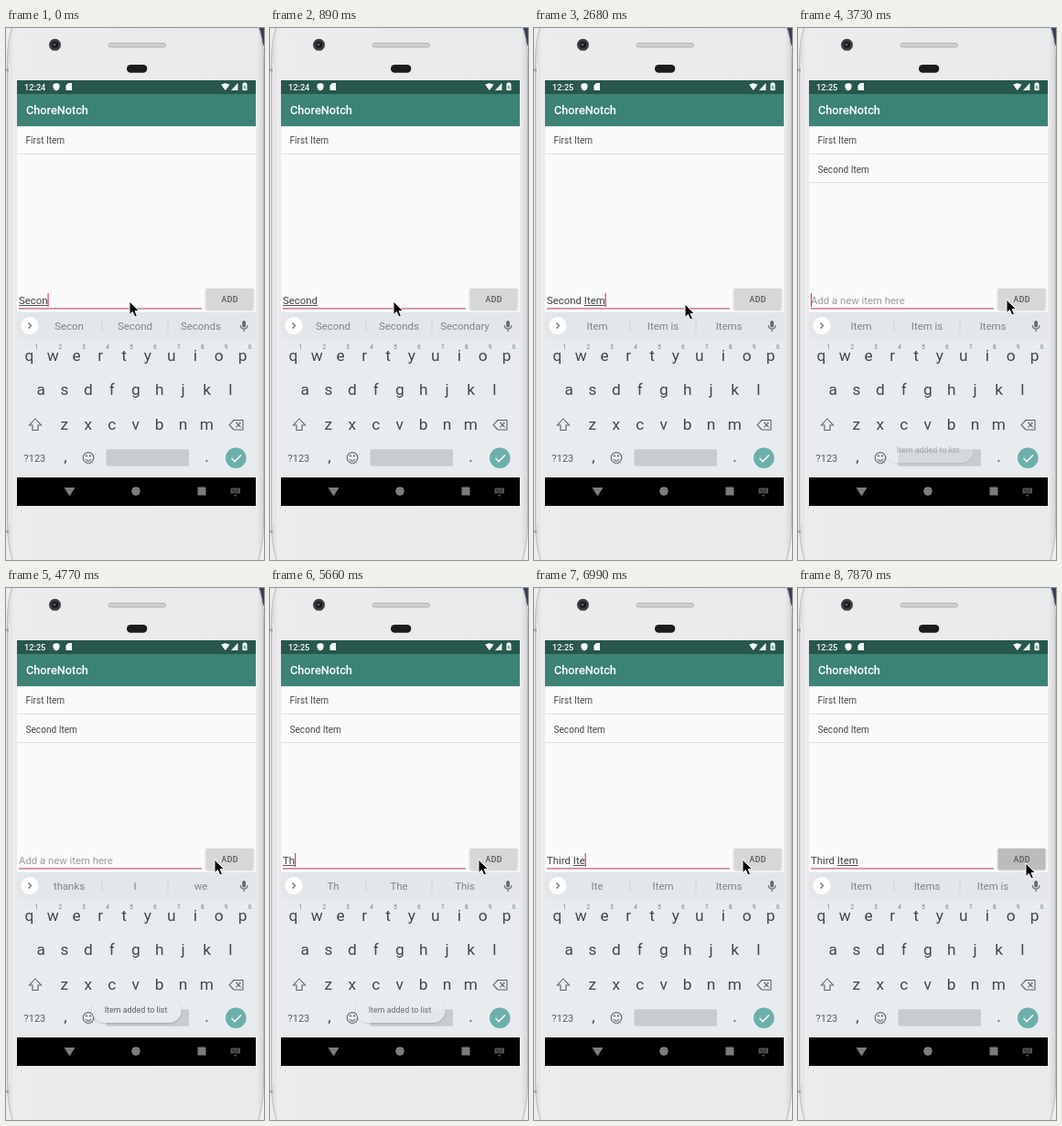
Animation, 282 px wide and 580 px high, one loop 8 s. Source, as an HTML page:

```html
<!DOCTYPE html>
<html lang="en">
<head>
<meta charset="utf-8">
<title>To-do list</title>
<style>
html, body { margin: 0; width: 100%; height: 100%; overflow: hidden; background: #eeecec; }
svg { display: block; width: 100%; height: 100%; font-family: Roboto, sans-serif; }
.mid { text-anchor: middle; }
.key { font-size: 17.3px; fill: #3d4a51; }
.num { font-size: 6.5px; fill: #737d82; }
.sug { font-size: 11.4px; fill: #7a8489; }
.row { font-size: 10.1px; fill: #484848; }
</style>
</head>
<body>
<svg id="stage" viewBox="0 0 282 580" xml:space="preserve">
  <defs>
    <linearGradient id="shell" x2="1" y2="0">
      <stop offset="0" stop-color="#d9d6d9"/>
      <stop offset=".025" stop-color="#ececee"/>
      <stop offset=".975" stop-color="#e9eaec"/>
      <stop offset="1" stop-color="#d6d5d8"/>
    </linearGradient>
    <filter id="soft" x="-20%" y="-40%" width="140%" height="200%">
      <feDropShadow dx="0" dy=".8" stdDeviation=".8" flood-opacity=".22"/>
    </filter>
  </defs>

  <path d="M272 0H282V20Z" fill="#35425c"/>
  <path d="M9 -6Q1.500 10 1.500 36V540Q1.500 565 9 586H274Q281.500 565 281.500 540V36Q281.500 10 274 -6Z" fill="url(#shell)" stroke="#bcb8bd"/>
  <path d="M4 40V540" stroke="#f3f1f3"/>
  <path d="M0 46H3M0 549H3" stroke="#aaa7ab" stroke-width="3"/>
  <rect x="112" y="16.500" width="62.500" height="4.500" rx="2.200" fill="#cfd0d2" stroke="#aaabae" stroke-width=".8"/>
  <circle cx="53.500" cy="18.300" r="6.500" fill="#3b3a3d"/>
  <circle cx="53.500" cy="18.300" r="3.500" fill="#17181c"/>
  <circle cx="53" cy="18" r="1.500" fill="#51576a"/>
  <rect x="132" y="40" width="22.300" height="8.700" rx="4.300" fill="#1d1b1e"/>

  <rect x="12" y="57" width="261" height="464" fill="#fafafa"/>
  <rect x="12" y="57" width="261" height="15" fill="#27574d"/>
  <rect x="12" y="72" width="261" height="35" fill="#3c8376"/>
  <path d="M12 107.500H273" stroke="#e4e8e7"/>
  <text id="clock" x="20" y="68" font-size="9.200" font-weight="500" fill="#fff"></text>
  <g fill="#fff">
    <path d="M55 60L58.500 61.300V64Q58.500 67 55 68.500Q51.500 67 51.500 64V61.300Z"/>
    <path d="M68 60H72V68H65.500V62.500Z"/>
    <path d="M235 61.800Q239.800 58.500 244.600 61.800L239.800 68Z"/>
    <path d="M253.500 60V68H246Z"/>
    <path d="M259.500 60.500V59.500H262.500V60.500H263.500V68H258.500V60.500Z"/>
  </g>
  <path d="M261.300 62L260 64.700H262L260.800 67" fill="none" stroke="#27574d" stroke-width=".8"/>
  <text x="22" y="94.300" font-size="12.700" font-weight="500" fill="#fff">ChoreNotch</text>

  <text class="row" x="21.500" y="126.300">First Item</text>
  <path d="M12 137.500H273" stroke="#e0e0e0"/>
  <g id="second">
    <text class="row" x="21.500" y="157.500">Second Item</text>
    <path d="M12 168.500H273" stroke="#e0e0e0"/>
  </g>

  <path d="M14 305.800H214" stroke="#c0647f" stroke-width="1.200"/>
  <text id="hint" x="14" y="300.500" font-size="11.350" fill="#9c9c9c">Add a new item here</text>
  <text id="field" x="14" y="300.500" font-size="11.400" fill="#404040"></text>
  <path id="under" stroke="#555"/>
  <path id="caret" stroke="#cf4274" stroke-width="1.200"/>
  <rect id="button" x="218.500" y="284" width="52" height="23" rx="1.300" filter="url(#soft)"/>
  <text class="mid" x="244.700" y="299.200" font-size="8.700" font-weight="500" letter-spacing=".4" fill="#555">ADD</text>

  <rect x="12" y="310" width="261" height="180" fill="#e9ecef"/>
  <rect x="12" y="310" width="261" height="29" fill="#e3e7ea"/>
  <path d="M105 318V332M177 318V332" stroke="#cfd4d7"/>
  <circle cx="26" cy="324.500" r="9.500" fill="#fff"/>
  <path d="M24.500 321.500L27.500 324.500L24.500 327.500" fill="none" stroke="#63717a" stroke-width="1.300"/>
  <g id="sugs"></g>
  <rect x="258.200" y="319" width="3.800" height="7.500" rx="1.900" fill="#626d73"/>
  <path d="M256.300 324Q256.500 328 260.100 328Q263.700 328 263.900 324M260.100 328V331" fill="none" stroke="#626d73" stroke-width="1.100"/>

  <g id="keys"></g>
  <g fill="none" stroke="#566269" stroke-width="1.100">
    <path d="M32 426L38.500 433H35V438.500H29V433H25.500Z"/>
    <path d="M249 427.500H259V438H249L244 432.700ZM251.500 430L256.500 435.300M256.500 430L251.500 435.300"/>
    <circle cx="90" cy="468.500" r="5.800"/>
    <path d="M87 470Q90 474 93 470"/>
  </g>
  <path d="M87 466.500H89M91 466.500H93" stroke="#566269" stroke-width="1.600"/>
  <text x="19.500" y="472.500" font-size="11" fill="#505d64">?123</text>
  <rect x="109.500" y="459.300" width="90.500" height="18.500" rx="2" fill="#c8ccd0"/>
  <circle cx="251.300" cy="468.800" r="11.300" fill="#6cb0aa"/>
  <path d="M246.500 469L250 472.500L257 465.500" fill="none" stroke="#fff" stroke-width="1.400"/>

  <g id="toast">
    <rect x="94" y="446.500" width="97.500" height="27.500" rx="13.700" fill="#e9ecee" filter="url(#soft)"/>
    <text class="mid" x="142" y="462.700" font-size="8.900" fill="#5c5c5c">Item added to list</text>
  </g>

  <rect x="12" y="490" width="261" height="31" fill="#000"/>
  <g fill="#7c7c7c">
    <path d="M63.500 501H75.500L69.500 510.500Z"/>
    <circle cx="142" cy="505" r="4.800"/>
    <rect x="209.500" y="500.500" width="9" height="9"/>
  </g>
  <g fill="#555">
    <rect x="245.500" y="501.500" width="10.500" height="6" rx=".6"/>
    <path d="M248.700 509H252.700L250.700 511Z"/>
  </g>
  <path d="M247 503.500H255M247 505H255M248.500 506.700H253" stroke="#111" stroke-width=".8" stroke-dasharray="1 .6"/>

  <path id="mouse" d="M0 0V14.500L3.400 11.400L5.800 17L8.400 15.900L6 10.500H10.500Z" fill="#000" stroke="#fff" stroke-width="1" stroke-linejoin="round"/>
</svg>
<script>
const LOOP = 8000;
const $ = id => document.getElementById(id);

function addText(parent, x, y, cls, text) {
  const el = document.createElementNS('http://www.w3.org/2000/svg', 'text');
  el.setAttribute('x', x);
  el.setAttribute('y', y);
  el.setAttribute('class', 'mid ' + cls);
  el.textContent = text;
  parent.append(el);
  return el;
}

const PITCH = 25.92;
[['qwertyuiop', 25.3, 363], ['asdfghjkl', 38.1, 400], ['zxcvbnm', 63.9, 438]].forEach(([row, x, y]) =>
  [...row].forEach((c, i) => addText($('keys'), x + i * PITCH, y, 'key', c)));
[...'1234567890'].forEach((c, i) => addText($('keys'), 33.3 + i * PITCH, 350, 'num', c));
addText($('keys'), 65, 472.5, 'key', ',');
addText($('keys'), 219.5, 472.5, 'key', '.');
const sugs = [69, 141, 213].map(x => addText($('sugs'), x, 329, 'sug', ''));

// Each step changes part of the state and holds until the next one.
const STEPS = [
  [0, { clock: '12:24', text: 'Secon', sug: 'Secon|Second|Seconds', caret: 1, mouse: [135, 298], press: 0, toast: 0, added: 0 }],
  [150, { text: 'Second' }],
  [300, { sug: 'Second|Seconds|Secondary' }],
  [750, { caret: 0 }],
  [900, { text: 'Second ', caret: 1 }],
  [1050, { sug: 'time|one|half' }],
  [1190, { clock: '12:25' }],
  [1340, { caret: 0 }],
  [1480, { caret: 1 }],
  [1780, { text: 'Second I', sug: 'I|I\'m|I\'ll' }],
  [1930, { text: 'Second It', sug: 'It|It\'s|Its' }],
  [2080, { text: 'Second Ite', sug: 'Ite|Item|Items' }],
  [2380, { text: 'Second Item', sug: 'Item|Item is|Items' }],
  [2680, { mouse: [165, 301] }],
  [2830, { mouse: [201, 300] }],
  [2980, { mouse: [228, 296], caret: 0 }],
  [3130, { press: 1 }],
  [3430, { text: '', added: 1, caret: 1 }],
  [3580, { press: 0 }],
  [3730, { toast: .4 }],
  [3880, { toast: .85 }],
  [4020, { toast: 1, sug: 'thanks|I|we', caret: 0 }],
  [4320, { caret: 1 }],
  [4770, { caret: 0 }],
  [5210, { caret: 1 }],
  [5510, { text: 'T', sug: 'T|The|To' }],
  [5660, { text: 'Th', sug: 'Th|The|This', toast: .85 }],
  [5810, { text: 'Thi', sug: 'Thi|This|Think', toast: .35 }],
  [5960, { toast: 0 }],
  [6100, { text: 'Thir', sug: 'Thir|Their|Third' }],
  [6250, { text: 'Third', sug: 'Third|Thirds|Thirdly' }],
  [6390, { text: 'Third ', sug: 'time|one|party' }],
  [6690, { text: 'Third I', sug: 'I|I\'m|I\'ll' }],
  [6840, { text: 'Third It', sug: 'It|It\'s|Its' }],
  [6980, { text: 'Third Ite', sug: 'Ite|Item|Items' }],
  [7130, { text: 'Third Item', sug: 'Item|Items|Item is' }],
  [7580, { caret: 0, mouse: [241, 299] }],
  [7730, { mouse: [249, 300] }],
  [7870, { press: 1 }]
];

const ruler = document.createElement('canvas').getContext('2d');
ruler.font = '114px Roboto, sans-serif';
const widthOf = s => ruler.measureText(s).width / 10;

const show = (id, on) => $(id).setAttribute('opacity', +on);

function render(t) {
  const s = {};
  for (const [at, change] of STEPS) if (at <= t) Object.assign(s, change);

  $('clock').textContent = s.clock;
  $('field').textContent = s.text;
  show('hint', !s.text);
  show('second', s.added);
  show('toast', s.toast);
  show('caret', s.caret);

  const end = 14 + widthOf(s.text);
  const start = 14 + widthOf(s.text.slice(0, s.text.lastIndexOf(' ') + 1));
  $('under').setAttribute('d', `M${start} 302.5H${end}`);
  $('caret').setAttribute('d', `M${end + .5} 289V304`);
  s.sug.split('|').forEach((word, i) => sugs[i].textContent = word);
  $('button').setAttribute('fill', s.press ? '#bcbcbc' : '#d6d7d7');
  $('mouse').setAttribute('transform', `translate(${s.mouse})`);
}

const begin = performance.now();
function tick() {
  render((performance.now() - begin) % LOOP);
  requestAnimationFrame(tick);
}
tick();
</script>
</body>
</html>
```
